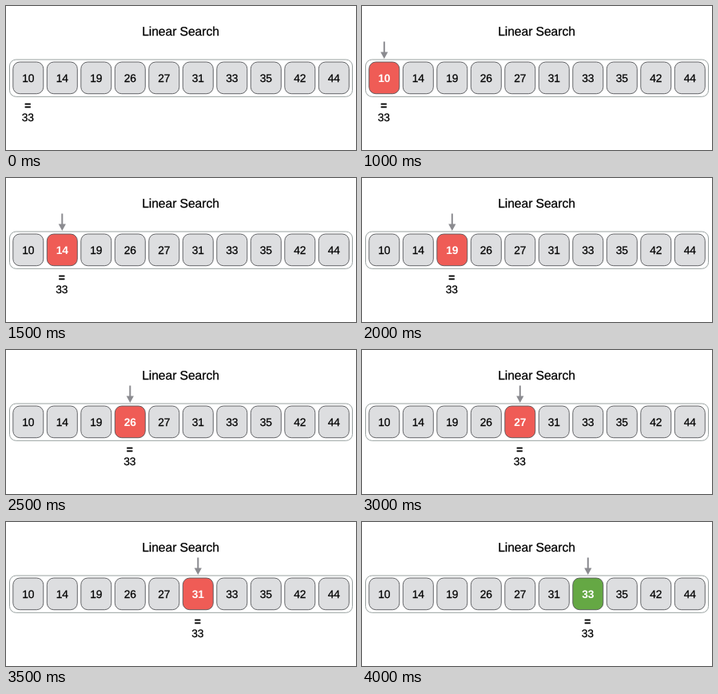
Write an HTML page that moves like this. It is 438 by 180 pixels and loops after 5500 ms.

```html
<!DOCTYPE html>
<html lang="en">
<head>
<meta charset="utf-8">
<title>Linear Search</title>
<style>
  html, body { margin: 0; width: 100%; height: 100%; overflow: hidden; background: #fff; }
  svg { display: block; }
  text {
    font: 13.8px "Liberation Sans", Arial, sans-serif;
    text-anchor: middle;
    text-rendering: geometricPrecision;
    fill: #000;
    stroke: #000;
    stroke-width: .25;
  }
  .title { font-size: 15.7px; letter-spacing: -.08px; }
  .equals { font-weight: bold; }
  .frame { fill: #fff; stroke: #98a09f; }
  .cell rect { fill: #dddee0; stroke: #55565a; stroke-width: .9; }
  .miss rect { fill: #ef5c56; }
  .hit rect { fill: #65a844; }
  .miss text, .hit text { fill: #fff; stroke: none; font-weight: bold; }
  #arrow { fill: #8b8b90; }
</style>
</head>
<body>
<svg width="438" height="180" viewBox="0 0 438 180">
  <text class="title" x="218.5" y="37.3">Linear Search</text>
  <rect class="frame" x="4.5" y="67" width="429" height="46.3" rx="8"/>
  <g id="cells"></g>
  <g id="pointer">
    <path id="arrow" d="M-1 44.5H1V57.5H4.6L0 66L-4.6 57.5H-1Z"/>
    <text class="equals" x="-.5" y="128.5">=</text>
    <text x="-.5" y="144.3">33</text>
  </g>
</svg>
<script>
const values = [10, 14, 19, 26, 27, 31, 33, 35, 42, 44];
const goal = values.indexOf(33);
const LOOP = 5500, START = 1000, STEP = 500;
const centerX = i => 27.8 + i * 42.5;

const cellGroup = document.getElementById("cells");
const pointer = document.getElementById("pointer");
const arrow = document.getElementById("arrow");

cellGroup.innerHTML = values.map((value, i) => `
  <g class="cell" transform="translate(${centerX(i)} 0)">
    <rect x="-19" y="70" width="38" height="39.7" rx="8.5"/>
    <text y="95">${value}</text>
  </g>`).join("");
const cells = [...cellGroup.children];

function draw(time) {
  const step = Math.min(goal, Math.floor((time % LOOP - START) / STEP));
  cells.forEach((cell, i) => {
    cell.classList.toggle("miss", i === step && i !== goal);
    cell.classList.toggle("hit", i === step && i === goal);
  });
  pointer.setAttribute("transform", `translate(${centerX(Math.max(0, step))} 0)`);
  arrow.style.display = step < 0 ? "none" : "";
}

const startTime = performance.now();
function tick() {
  draw(performance.now() - startTime);
  requestAnimationFrame(tick);
}
tick();
</script>
</body>
</html>
```
